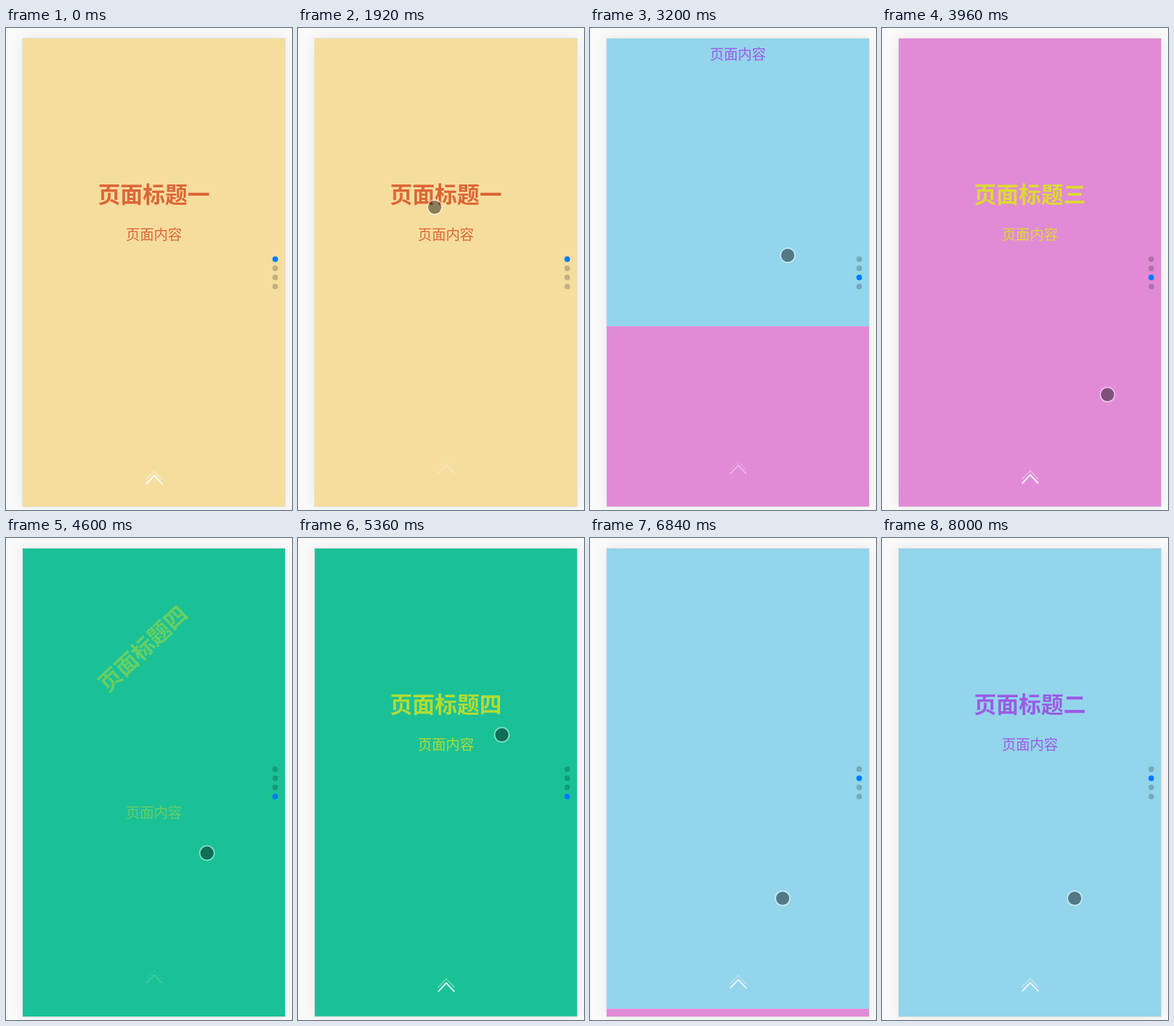
Write an HTML page with a canvas that moves like this. It is 409 px wide and 687 px high and loops after 8.08 s.

```html
<!DOCTYPE html>
<html lang="zh-CN">
<head>
<meta charset="utf-8">
<style>
html, body { margin: 0; width: 100%; height: 100%; overflow: hidden; background: #fafafa; }
canvas { display: block; width: 409px; height: 687px; }
</style>
</head>
<body>
<canvas></canvas>
<script>
const LOOP = 8080, SETTLE = 300, ENTER = 500;
const LEFT = 24, TOP = 15, WIDTH = 375, HEIGHT = 667, CENTER = 211.5;
const FAMILY = '"Noto Sans CJK SC", "Noto Sans CJK", "Noto Sans CJK JP", sans-serif';

const canvas = document.querySelector('canvas');
const ctx = canvas.getContext('2d');
const ratio = window.devicePixelRatio || 1;
canvas.width = 409 * ratio;
canvas.height = 687 * ratio;

const pages = [
  { title: '页面标题一', back: '#f5dd9e', ink: '#dc6636', entry: 'roll' },
  { title: '页面标题二', back: '#93d5eb', ink: '#9b5be6', entry: 'zoom' },
  { title: '页面标题三', back: '#e18bd6', ink: '#dcd934', entry: 'roll' },
  { title: '页面标题四', back: '#1ac197', ink: '#b0dc33', entry: 'roll' }
];

const point = (time, x, y) => ({ time, x, y });
const swipe = (from, to, press, release) => ({ from, to, press, release });

const swipes = [
  swipe(0, 1, point(2130, 262, 470), point(2320, 275, 260)),
  swipe(1, 2, point(2900, 284, 502), point(3160, 282.5, 322.5)),
  swipe(2, 3, point(3960, 322.5, 522.5), point(4150, 300, 320)),
  swipe(3, 3, point(4860, 282, 505), point(5080, 291.5, 280.5)),
  swipe(3, 2, point(5380, 291.5, 280.5), point(5690, 279, 420)),
  swipe(2, 1, point(6200, 274.5, 318.5), point(6600, 275.5, 513.5))
];

// The pointer enters, then glides from one swipe to the next.
const pointerPath = [
  point(1080, 46, 20),
  point(1920, 195.5, 255.5),
  ...swipes.flatMap(s => [s.press, s.release])
];

const clamp = v => Math.min(1, Math.max(0, v));
const mix = (a, b, k) => a + (b - a) * k;
const smooth = k => k * k * (3 - 2 * k);
const lastSwipe = test => swipes.filter(test).pop();

// CSS "ease": cubic-bezier(.25, .1, .25, 1)
function ease(x) {
  if (x <= 0 || x >= 1) return clamp(x);
  const bezier = (s, a, b) => 3 * a * s * (1 - s) ** 2 + 3 * b * s * s * (1 - s) + s ** 3;
  let low = 0, high = 1;
  for (let i = 0; i < 20; i++) {
    const mid = (low + high) / 2;
    if (bezier(mid, 0.25, 0.25) < x) low = mid; else high = mid;
  }
  return bezier(low, 0.1, 1);
}

function pointerAt(t) {
  const next = pointerPath.findIndex(p => p.time > t);
  if (next < 0) return pointerPath[pointerPath.length - 1];
  if (next === 0) return null;
  const a = pointerPath[next - 1], b = pointerPath[next];
  const k = smooth((t - a.time) / (b.time - a.time));
  return { x: mix(a.x, b.x, k), y: mix(a.y, b.y, k) };
}

// Scroll position under the finger; pulling past the last page is damped.
function dragged({ from, to, press }, y) {
  const distance = press.y - y;
  return from * HEIGHT + (from === to ? Math.max(0, distance) ** 0.85 : distance);
}

function scrollAt(t) {
  const current = lastSwipe(s => s.press.time <= t);
  if (!current) return 0;
  const { release, to } = current;
  if (t < release.time) return dragged(current, pointerAt(t).y);
  return mix(dragged(current, release.y), to * HEIGHT, ease((t - release.time) / SETTLE));
}

function disc(x, y, r, color) {
  ctx.fillStyle = color;
  ctx.beginPath();
  ctx.arc(x, y, r, 0, Math.PI * 2);
  ctx.fill();
}

function drawDevice() {
  ctx.fillStyle = '#fafafa';
  ctx.fillRect(0, 0, 409, 687);
  ctx.save();
  ctx.shadowColor = 'rgba(0,0,0,.07)';
  ctx.shadowBlur = 20 * ratio;
  ctx.fillStyle = '#e2e2e2';
  ctx.fillRect(LEFT - 1, TOP - 1, WIDTH + 2, HEIGHT + 2);
  ctx.restore();
  ctx.fillStyle = '#fff';
  ctx.fillRect(LEFT, TOP, WIDTH, HEIGHT);
}

function drawText(page, progress) {
  const rest = 1 - ease(progress);
  const zoom = page.entry === 'zoom';
  ctx.save();
  ctx.fillStyle = page.ink;
  ctx.textAlign = 'center';
  ctx.globalAlpha = 1 - rest;

  ctx.save();
  ctx.font = 'bold 32px ' + FAMILY;
  if (zoom) {
    const scale = progress < 0.6
      ? mix(0.3, 1.05, smooth(progress / 0.6))
      : mix(1.05, 1, smooth((progress - 0.6) / 0.4));
    ctx.translate(CENTER, 237);
    ctx.scale(scale, scale);
  } else {
    ctx.translate(CENTER - 33 * rest, 237 - 165 * rest);
    ctx.rotate(-Math.PI / 2 * rest);
  }
  ctx.fillText(page.title, 0, 12);
  ctx.restore();

  ctx.font = '20px ' + FAMILY;
  ctx.fillText('页面内容', CENTER, 302 + (zoom ? 0 : 200 * rest));
  ctx.restore();
}

function drawPages(t) {
  const scroll = scrollAt(t);
  const arrival = lastSwipe(s => s.from !== s.to && s.release.time + SETTLE <= t);
  const shown = arrival ? arrival.to : 0;
  const progress = arrival ? clamp((t - arrival.release.time - SETTLE) / ENTER) : 1;
  pages.forEach((page, i) => {
    const offset = i * HEIGHT - scroll;
    if (Math.abs(offset) >= HEIGHT) return;
    ctx.save();
    ctx.translate(0, offset);
    ctx.fillStyle = page.back;
    ctx.fillRect(LEFT, TOP, WIDTH, HEIGHT);
    if (i === shown) drawText(page, progress);
    ctx.restore();
  });
}

function drawBullets(t) {
  const last = lastSwipe(s => s.release.time <= t);
  const active = last ? last.to : 0;
  pages.forEach((_, i) => disc(385, 329.5 + 13 * i, 4, i === active ? '#007aff' : 'rgba(0,0,0,.2)'));
}

function drawArrow(t) {
  const cycle = (0.45 + t / 1312) % 1;
  const y = mix(642.5, 616, smooth(cycle));
  const opacity = 1 - cycle ** 4;
  const chevron = (tip, width, alpha) => {
    ctx.strokeStyle = `rgba(255,255,255,${alpha * opacity})`;
    ctx.lineWidth = width;
    ctx.beginPath();
    ctx.moveTo(200.3, tip + 12.3);
    ctx.lineTo(212, tip);
    ctx.lineTo(223.7, tip + 12.3);
    ctx.stroke();
  };
  chevron(y + 0.5, 1.6, 0.4);
  chevron(y + 6.5, 2, 0.95);
}

function drawPointer(t) {
  const pointer = pointerAt(t);
  if (!pointer) return;
  disc(pointer.x, pointer.y, 9.5, 'rgba(0,0,0,.43)');
  ctx.strokeStyle = 'rgba(255,255,255,.45)';
  ctx.lineWidth = 1.8;
  ctx.beginPath();
  ctx.arc(pointer.x, pointer.y, 10.4, 0, Math.PI * 2);
  ctx.stroke();
}

const start = performance.now();

function draw() {
  const t = (performance.now() - start) % LOOP;
  ctx.setTransform(ratio, 0, 0, ratio, 0, 0);
  drawDevice();
  ctx.save();
  ctx.beginPath();
  ctx.rect(LEFT, TOP, WIDTH, HEIGHT);
  ctx.clip();
  drawPages(t);
  drawArrow(t);
  drawBullets(t);
  drawPointer(t);
  ctx.restore();
  requestAnimationFrame(draw);
}
draw();
</script>
</body>
</html>
```
